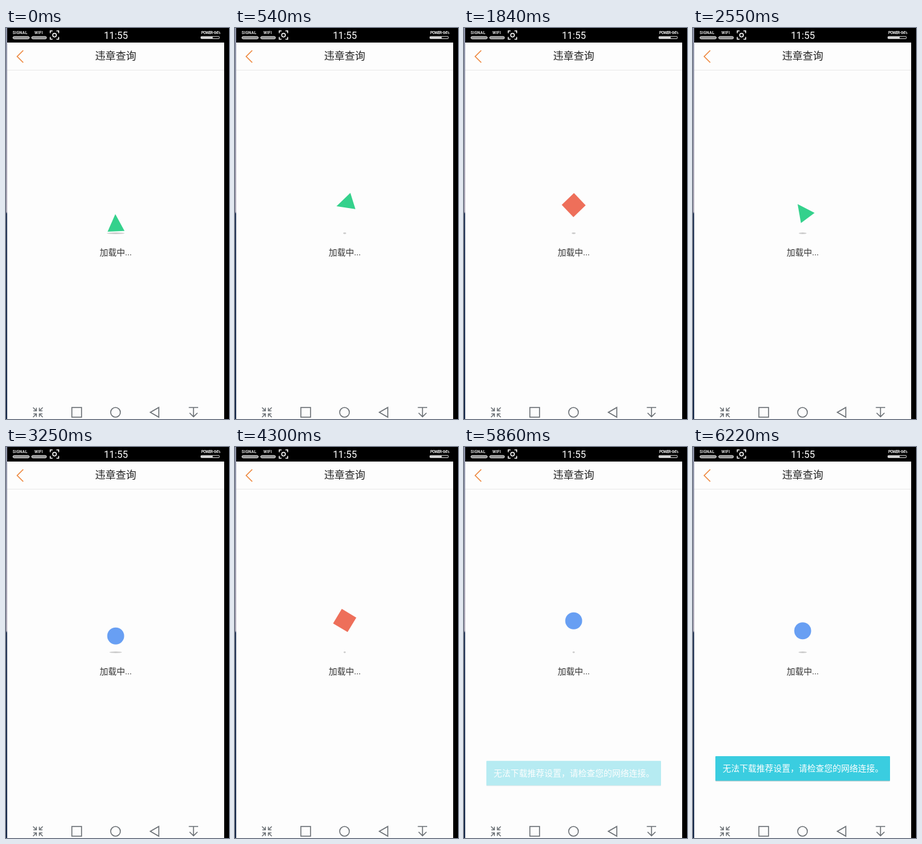
These frames come from a looping animation (369x645 px, 6450 ms). An HTML page:

```html
<!DOCTYPE html>
<html lang="zh-CN">
<head>
<meta charset="utf-8">
<title>加载中</title>
<style>
  html, body { margin: 0; width: 100%; height: 100%; overflow: hidden; background: #000; }
  svg { display: block; width: 369px; height: 645px; }
  text { font-family: Roboto, "Noto Sans CJK SC", "Noto Sans CJK", sans-serif; }
  .label { font-size: 6.6px; font-weight: 700; fill: #e4e4e4; }
  .line { fill: none; stroke: #6b7075; stroke-width: 1.6; }
  .bar { fill: #8d8d8d; stroke: #e6e6e6; stroke-width: 1; }
</style>
</head>
<body>
<svg viewBox="0 0 369 645">
  <defs>
    <linearGradient id="edge" x1="0" y1="0" x2="0" y2="1">
      <stop offset="0" stop-color="#8d93a8"/>
      <stop offset=".47" stop-color="#a9a4b4"/>
      <stop offset=".475" stop-color="#2b3c5c"/>
      <stop offset="1" stop-color="#16294a"/>
    </linearGradient>
  </defs>

  <rect width="369" height="645"/>
  <rect width="2" height="645" fill="url(#edge)"/>
  <rect x="2" y="24" width="359" height="621" fill="#fdfdfd"/>

  <!-- status bar -->
  <text class="label" x="11" y="10.3" letter-spacing=".2">SIGNAL</text>
  <text class="label" x="47" y="10.3" letter-spacing=".2">WIFI</text>
  <text class="label" x="323" y="10.3" letter-spacing="-.8">POWER- 64%</text>
  <rect class="bar" x="11.5" y="14" width="27" height="4" rx="2"/>
  <rect class="bar" x="42.5" y="14" width="24.5" height="4" rx="2"/>
  <rect class="bar" x="322.5" y="14" width="30.5" height="3.6" rx=".8" style="fill:#000"/>
  <rect x="323" y="14.2" width="19" height="3.2" fill="#d8d8d8"/>
  <g fill="none" stroke="#fff" stroke-width="1.5">
    <path d="M73.3 8.5V4.8H77M83.5 4.8H87.2V8.5M87.2 14.8V18.5H83.5M77 18.5H73.3V14.8"/>
    <circle cx="80.3" cy="11.7" r="3"/>
  </g>
  <text x="181.8" y="18.3" font-size="16" fill="#fff" text-anchor="middle">11:55</text>

  <!-- title bar -->
  <path d="M28.5 37L18.5 47L28.5 57" fill="none" stroke="#ee8a42" stroke-width="1.7"/>
  <text x="181.5" y="52.3" font-size="17" fill="#222" text-anchor="middle">违章查询</text>
  <rect x="2" y="69" width="359" height="1" fill="#e8e8e8"/>

  <!-- loader -->
  <ellipse id="shadow" cx="181.5" cy="338.6" ry="1.3" fill="#cbcbcb"/>
  <path id="shape"/>
  <text x="155" y="375.3" font-size="14" fill="#333">加载中...</text>

  <!-- message -->
  <g id="toast">
    <rect x="37" y="511" width="289" height="40.5" rx="1" fill="#8fa9ad" opacity=".7"/>
    <rect x="37" y="510" width="289" height="40.5" rx="1" fill="#3acde0"/>
    <text x="49" y="535.3" font-size="14" fill="#fff">无法下载推荐设置，请检查您的网络连接。</text>
  </g>

  <!-- navigation bar -->
  <g class="line">
    <g id="collapse" transform="translate(52.8 634)"></g>
    <rect x="109" y="626" width="16" height="16"/>
    <circle cx="181.2" cy="634" r="8"/>
    <path d="M238.8 634L252.8 626V642Z"/>
    <path d="M302.5 626H318M310.3 626V641M303.8 635L310.3 641.3L316.8 635"/>
  </g>
</svg>
<script>
const $ = id => document.getElementById(id);
const shape = $('shape'), shadow = $('shadow'), toast = $('toast');

$('collapse').innerHTML = [[1, 1], [-1, 1], [1, -1], [-1, -1]].map(([x, y]) =>
  `<path transform="scale(${x} ${y})" d="M8 8L2.5 2.5M2.5 7.5V2.5H7.5"/>`).join('');

const LOOP = 6450, CX = 181.5, LOW = 322.7, HIGH = 285;
const kinds = [
  { d: 'M0 -14.2L14 14.2H-14Z', fill: '#34d18c', turn: -120 },
  { d: 'M-14 0A14 14 0 1 1 14 0A14 14 0 1 1 -14 0Z', fill: '#689ff3', turn: 0 },
  { d: 'M-14 -14H14V14H-14Z', fill: '#ee6f5a', turn: -90 }
];
// Moments when the shape leaves the ground
const bounces = [-8, 802, 1610, 2424, 3188, 3975, 4763, 5550, 6340];

// The picture advances in held steps: first, last, count
const ticks = [0];
for (const [from, to, n] of [
  [90, 720, 8], [800, 1430, 8], [1520, 1700, 3], [1840, 2460, 8], [2550, 3160, 8],
  [3250, 3860, 8], [3950, 4560, 8], [4640, 5260, 8], [5340, 5950, 8], [6040, 6220, 3]
]) for (let i = 0; i < n; i++) ticks.push(Math.round((from + (to - from) * i / (n - 1)) / 10) * 10);

const easeOut = x => 1 - (1 - x) ** 2;
const clamp = x => Math.min(1, Math.max(0, x));

function draw(t) {
  const k = bounces.findLastIndex(b => b <= t);
  const s = (t - bounces[k]) / (bounces[k + 1] - bounces[k]);
  const lift = 1 - (1 - 2 * s) ** 2;
  const { d, fill, turn } = kinds[k % 3];
  shape.setAttribute('d', d);
  shape.setAttribute('fill', fill);
  shape.setAttribute('transform',
    `translate(${CX} ${LOW + (HIGH - LOW) * lift}) rotate(${turn * easeOut(s)})`);
  shadow.setAttribute('rx', 1.6 + 14 * (1 - lift) ** 1.3);

  const shown = easeOut(clamp((t - 5780) / 400));
  toast.setAttribute('opacity', shown);
  toast.setAttribute('transform', `translate(0 ${12 * (1 - shown)})`);
}

const start = performance.now();
function frame() {
  const t = (performance.now() - start) % LOOP;
  draw(ticks.findLast(x => x <= t) ?? 0);
  requestAnimationFrame(frame);
}
frame();
</script>
</body>
</html>
```
